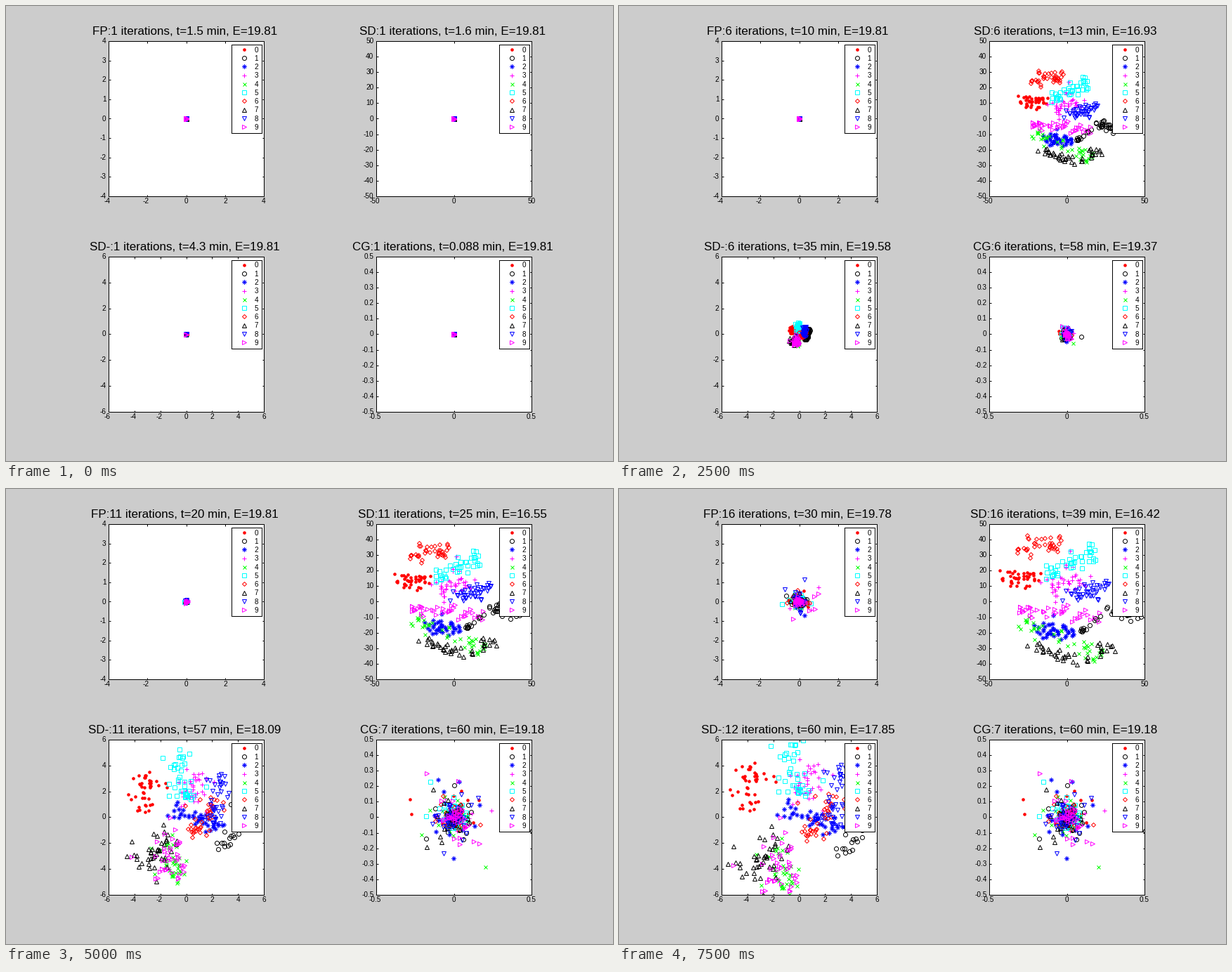
These frames come from a looping animation (864 px wide and 648 px high, 8000 ms). A matplotlib script:

```python
import numpy as np
import matplotlib.pyplot as plt
from matplotlib.animation import FuncAnimation

W, H, DPI = 864, 648, 72
STEPS, STEP_MS = 16, 500
SIDE, POINTS = 221, 40

plt.rcParams.update({"font.family": "Liberation Sans", "toolbar": "None"})
rng = np.random.default_rng(12)

# marker, colour, size of each digit class
STYLES = [("o", "red", 4.6), ("o", "black", 6), ((8, 2, 0), "blue", 6.6),
          ("+", "magenta", 6.6), ("x", "lime", 5), ("s", "cyan", 6),
          ("D", "red", 4.2), ("^", "black", 5.4), ("v", "blue", 5.4),
          (">", "magenta", 5.4)]

# one stroke per class: x0, y0, x1, y1, width, bow
SD_STROKES = [
    (-37, 14, -23, 17, 6, 0), (10, -19, 42, -9, 3, 8), (-17, -17, 2, -20, 6, 0),
    (-8, 8, 6, 16, 7, 0), (-28, -12, 20, -34, 5, 0), (-12, 18, 15, 32, 5, 0),
    (-30, 34, -7, 38, 5, 0), (-19, -30, 28, -29, 4, -7), (4, 2, 25, 11, 5, 0),
    (-30, -5, 18, -9, 4, 0)]
SDM_STROKES = [
    (-4.1, 1.6, -3.7, 3.7, 1.1, 0), (3.1, -2.7, 5.2, 2.5, .4, -1.2),
    (-1.2, .7, 2.8, -.7, .9, 0), (.3, 1.8, .8, 3.6, 1.3, 0),
    (-1.5, -2.8, -1, -5, 1.2, 0), (-.9, 5.4, 0, 1.6, 1, 0),
    (.6, -1.4, 2.8, 1.4, .8, 0), (-4, -4.8, -1.8, -2, 1.4, 0),
    (2.6, -.4, 3.1, 3.8, .9, 0), (-1.5, -2.2, -1.9, -5.4, 1.3, 0)]


def stroke(x0, y0, x1, y1, width, bow):
    """Points along a bent line, denser at both ends, with a few strays."""
    t = (1 - np.cos(np.pi * rng.random(POINTS))) / 2
    line = np.array([x0 + (x1 - x0) * t, y0 + (y1 - y0) * t + bow * 4 * t * (1 - t)])
    return line + width / 2 * rng.standard_t(6, (2, POINTS))


def burst(core, tail):
    """A dense core with a long tail in every direction."""
    r = core * np.exp(tail * rng.normal(size=POINTS))
    a = rng.random(POINTS) * 2 * np.pi
    return r * np.array([np.cos(a), np.sin(a)])


def sd_map(it):
    early = np.array([[.35, 0], [-.09, .18]])
    if it <= 4:
        return early * .2 ** (4 - it)
    late = np.eye(2) * (it / 16) ** .33
    return (early + late) / 2 if it == 5 else late


def fp_map(it):
    return np.eye(2) * .62 ** (16 - it)


def sdm_map(it):
    return np.eye(2) * (max(it - 4, .1) / 8) ** 1.4


def cg_map(it):
    return np.eye(2) * .18 ** (7 - it)


# axes: left, top, limit, x step, y step; titles: key iterations, minutes, energy
PANELS = {
    "FP": dict(axes=(146, 50, 4, 2, 1), grow=fp_map,
               clouds=[burst(.14, .8) for _ in STYLES],
               keys=(1, 4, 6, 8, 10, 13, 16),
               minutes=(1.5, 6.8, 10, 14, 18, 24, 30),
               energy=(19.81, 19.81, 19.81, 19.81, 19.81, 19.81, 19.78)),
    "SD": dict(axes=(527, 50, 50, 50, 10), grow=sd_map,
               clouds=[stroke(*s) for s in SD_STROKES],
               keys=(1, 4, 6, 8, 10, 13, 16),
               minutes=(1.6, 8.8, 13, 18, 22, 30, 39),
               energy=(19.81, 17.88, 16.93, 16.68, 16.58, 16.49, 16.42)),
    "SD-": dict(axes=(146, 357, 6, 2, 2), grow=sdm_map,
                clouds=[stroke(*s) for s in SDM_STROKES],
                keys=(1, 4, 6, 8, 10, 12),
                minutes=(4.3, 24, 35, 44, 54, 60),
                energy=(19.81, 19.81, 19.58, 18.89, 18.32, 17.85)),
    "CG": dict(axes=(527, 357, .5, .5, .1), grow=cg_map,
               clouds=[burst(.045, .95) for _ in STYLES],
               keys=(1, 4, 6, 7),
               minutes=(.088, 30, 58, 60),
               energy=(19.81, 19.76, 19.37, 19.18)),
}

fig = plt.figure(figsize=(W / DPI, H / DPI), dpi=DPI, facecolor="#cccccc")


def box(x, y, w, h, **kw):
    ax = fig.add_axes([x / W, 1 - (y + h) / H, w / W, h / H], facecolor="white", **kw)
    ax.tick_params(direction="in", length=2.5, width=1, top=True, right=True,
                   labelbottom=False, labelleft=False)
    for s in ax.spines.values():
        s.set(linewidth=1, antialiased=False)
    return ax


def label(x, y, s, size=10, ha="center"):
    return fig.text(x / W, 1 - y / H, s, size=size, ha=ha, va="baseline")


def marks(ax, k):
    marker, c, size = STYLES[k]
    dot = k == 0
    width = 0 if dot else .7 if k == 2 else 1
    return ax.plot([], [], ls="none", marker=marker, ms=size, mec=c, mew=width,
                   mfc=c if dot else "none", antialiased=False)[0]


def legend(x, y):
    ax = box(x, y, 43, 126, zorder=5)
    ax.set(xlim=(0, 43), ylim=(126, 0), xticks=[], yticks=[])
    for k in range(10):
        row = 6.8 + 12.27 * k
        marks(ax, k).set_data([17.5], [row])
        ax.text(35.5, row + 3.7, str(k), size=10, ha="center", va="baseline")


def ticks(lim, step):
    n = round(lim / step)
    return np.arange(-n, n + 1) * step


def panel(left, top, lim, xstep, ystep):
    ax = box(left, top, SIDE, SIDE)
    xs, ys = ticks(lim, xstep), ticks(lim, ystep)
    ax.set(xlim=(-lim, lim), ylim=(-lim, lim), xticks=xs, yticks=ys)
    scale = SIDE / (2 * lim)
    for v in xs:
        label(left + (v + lim) * scale - 2 * (v < 0), top + SIDE + 9.8, f"{v:g}")
    for v in ys:
        label(left - 3.5, top + (lim - v) * scale + 3, f"{v:g}", ha="right")
    legend(left + 175, top + 5)
    return [marks(ax, k) for k in range(10)], label(left + 108.5, top - 8.7, "", 17)


views = {name: panel(*p["axes"]) for name, p in PANELS.items()}


def update(i):
    for name, p in PANELS.items():
        lines, title = views[name]
        it = min(i + 1, p["keys"][-1])
        minutes = np.interp(it, p["keys"], p["minutes"])
        energy = np.interp(it, p["keys"], p["energy"])
        title.set_text(f"{name}:{it} iterations, t={minutes:.2g} min, E={energy:.4g}")
        grow = p["grow"](it)
        for line, cloud in zip(lines, p["clouds"]):
            line.set_data(*(grow @ cloud))
    return []


anim = FuncAnimation(fig, update, frames=STEPS, interval=STEP_MS, repeat=True)
plt.show()
```
